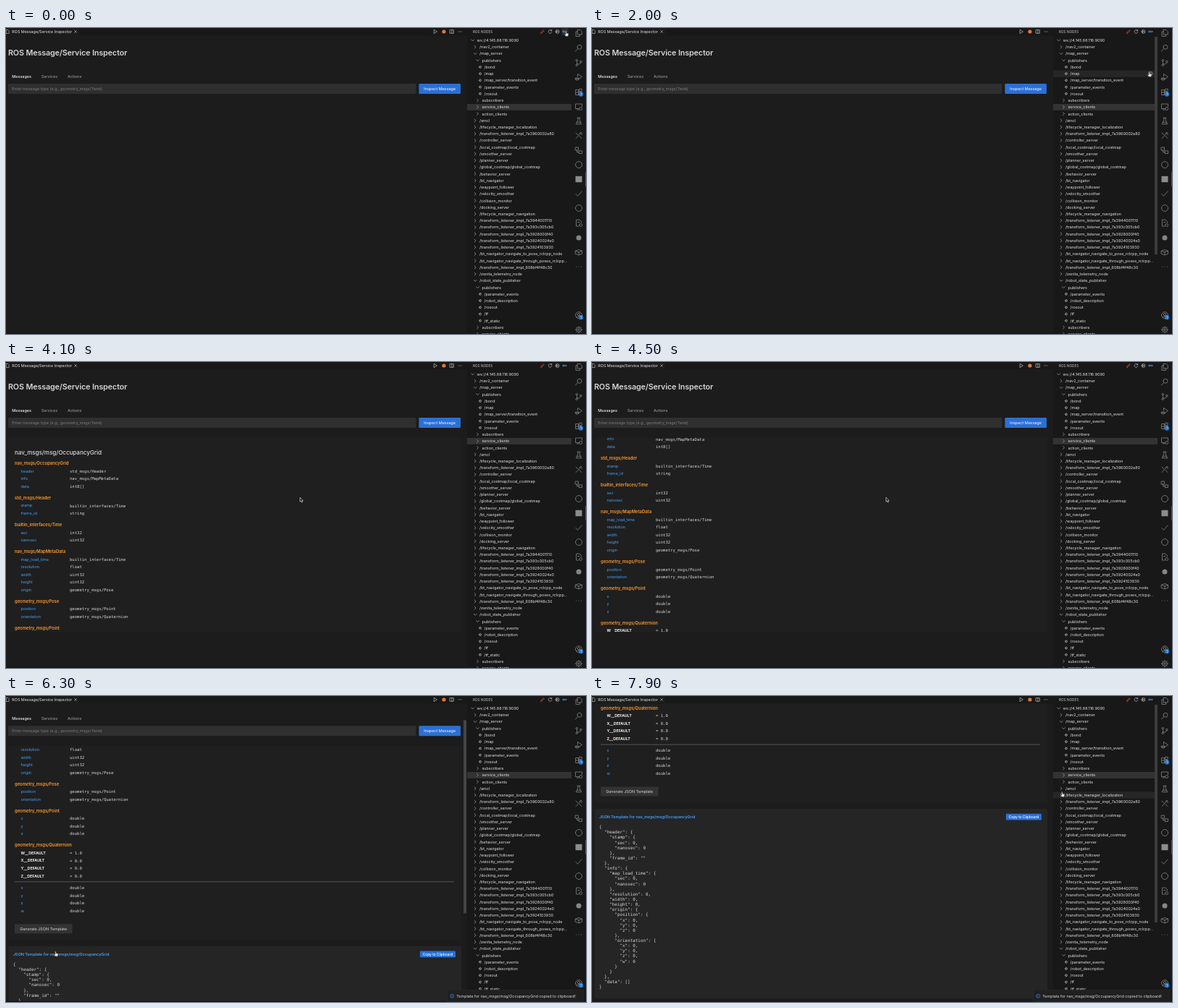
An HTML page for the animation above (8 s loop, 800 by 423 pixels).

```html
<!DOCTYPE html>
<html lang="en">
<head>
<meta charset="utf-8">
<title>Message inspector</title>
<style>
html, body { margin: 0; width: 100%; height: 100%; overflow: hidden; background: #1c1c1d; }
svg { display: block; width: 800px; height: 423px; font: 5.45px Inter, "Liberation Sans", sans-serif; }
.mono { font-family: "DejaVu Sans Mono", "Liberation Mono", monospace; }
.icon { fill: none; stroke: #858585; stroke-width: .8; stroke-linejoin: round; stroke-linecap: round; }
</style>
</head>
<body>
<svg id="stage" viewBox="0 0 800 423"></svg>
<script>
const LOOP = 8000, STEP = 100, ROW = 9.23, INNER = 173.4, PAGE = 225.5;
const GREY = '#d8d8d8', BLUE = '#45a4fa', ORANGE = '#fa9a2c';

const text = (x, y, s, fill = GREY, size = 5.45, extra = '') =>
  `<text x="${x}" y="${y + size * .37}" font-size="${size}" fill="${fill}" ${extra}>${s}</text>`;
const mono = (x, y, s, size = 5.57) => text(x, y, s, GREY, size, 'class="mono"');
const box = (x, y, w, h, fill, r = 0, extra = '') =>
  `<rect x="${x}" y="${y}" width="${w}" height="${h}" rx="${r}" fill="${fill}" ${extra}/>`;
const icon = (x, y, d, extra = '') => `<path class="icon" transform="translate(${x} ${y})" d="${d}" ${extra}/>`;
const disc = (x, y, r, fill) => `<circle cx="${x}" cy="${y}" r="${r}" fill="${fill}"/>`;
const ring = r => `M${-r} 0a${r} ${r} 0 1 0 ${2 * r} 0a${r} ${r} 0 1 0 ${-2 * r} 0`;
const style = (color, width = .7) => `style="stroke:${color};stroke-width:${width}"`;
const SEMI = 'font-weight="600"', MEDIUM = 'font-weight="500"', MID = 'text-anchor="middle"';

// ---- message definition
const types = `nav_msgs/OccupancyGrid|header std_msgs/Header|info nav_msgs/MapMetaData|data int8[]
std_msgs/Header|stamp builtin_interfaces/Time|frame_id string
builtin_interfaces/Time|sec int32|nanosec uint32
nav_msgs/MapMetaData|map_load_time builtin_interfaces/Time|resolution float|width uint32|height uint32|origin geometry_msgs/Pose
geometry_msgs/Pose|position geometry_msgs/Point|orientation geometry_msgs/Quaternion
geometry_msgs/Point|x double|y double|z double
geometry_msgs/Quaternion|W =1.0|X =0.0|Y =0.0|Z =0.0|-|x double|y double|z double|w double`;

function definition() {
  let y = 140, out = text(12, 124.7, 'nav_msgs/msg/OccupancyGrid', '#dcdcdc', 8, MEDIUM);
  for (const line of types.split('\n')) {
    const [head, ...fields] = line.split('|');
    out += text(12, y, head, ORANGE, 5.85, SEMI);
    y += 10.8;
    for (const field of fields) {
      const [name, type] = field.split(' ');
      if (name === '-') {
        out += box(12, y - 2.7, 606, .7, '#6c6c6c');
        y += 5.8;
        continue;
      }
      const constant = type[0] === '=';
      out += constant
        ? text(20.5, y, name + '__DEFAULT', '#f0f0f0', 5.3, 'font-weight="700"')
        : text(20.5, y, name, BLUE);
      out += mono(88, y, constant ? '= ' + type.slice(1) : type);
      y += 10.55;
    }
    y += 5.2;
  }
  return out + box(12, 351 + INNER, 79.5, 13, '#333334', 1) +
    text(51.7, 357.6 + INNER, 'Generate JSON Template', GREY, 5.45, MID);
}

// ---- JSON panel
const time = { sec: 0, nanosec: 0 }, point = { x: 0, y: 0, z: 0 };
const sample = {
  header: { stamp: time, frame_id: '' },
  info: {
    map_load_time: time, resolution: 0, width: 0, height: 0,
    origin: { position: point, orientation: { ...point, w: 0 } }
  },
  data: []
};
function jsonPanel() {
  const lines = JSON.stringify(sample, null, 2).split('\n');
  return box(3.5, 381.5, 624.5, 262, '#252526', 1) +
    text(10, 392.7, 'JSON Template for nav_msgs/msg/OccupancyGrid', BLUE, 5.4, SEMI) +
    box(571, 388.3, 49, 8.8, '#2b70d4', 1) +
    text(595.5, 392.7, 'Copy to Clipboard', '#fff', 4.8, MID + ' ' + MEDIUM) +
    lines.map((line, i) => {
      const s = line.trimStart();
      return mono(10 + (line.length - s.length) * 3.56, 406.5 + i * 7.13, s, 5.91);
    }).join('');
}

// ---- node tree: depth, kind (> closed, v open, o topic), label
const tree = `0v ws://4.145.88.116:9090
1> /nav2_container
1v /map_server
2v publishers
3o /bond
3o /map
3o /map_server/transition_event
3o /parameter_events
3o /rosout
2> subscribers
2> service_clients
2> action_clients
1> /amcl
1> /lifecycle_manager_localization
1> /transform_listener_impl_7a3960002a80
1> /controller_server
1> /local_costmap/local_costmap
1> /smoother_server
1> /planner_server
1> /global_costmap/global_costmap
1> /behavior_server
1> /bt_navigator
1> /waypoint_follower
1> /velocity_smoother
1> /collision_monitor
1> /docking_server
1> /lifecycle_manager_navigation
1> /transform_listener_impl_7a3944001110
1> /transform_listener_impl_7a393c005cb0
1> /transform_listener_impl_7a3928000f40
1> /transform_listener_impl_7a39240024e0
1> /transform_listener_impl_7a3924103930
1> /bt_navigator_navigate_to_pose_rclcpp_node
1> /bt_navigator_navigate_through_poses_rclcpp...
1> /transform_listener_impl_608bf4f48c30
1> /zenita_telemetry_node
1v /robot_state_publisher
2v publishers
3o /parameter_events
3o /robot_description
3o /rosout
3o /tf
3o /tf_static
2> subscribers
2> service_clients`.split('\n');

const marks = { '>': 'M-1 -1.9L1 0L-1 1.9', 'v': 'M-1.9 -1L0 1L1.9 -1', 'o': ring(1.4) };
const treeRows = () => tree.map((line, i) => {
  const depth = +line[0], kind = line[1], y = 17 + i * ROW;
  const x = 643.7 + depth * 3.45;
  return icon(x, y, marks[kind], style('#c0c0c0', kind === 'o' ? .8 : .6)) +
    text(x + (depth === 3 ? 5.5 : 5.9), y, line.slice(3), '#e2e2e2', 5.4);
}).join('');

// ---- activity bar
const activity = [
  [7, 'M-1.5 -4.5H2L4.3 -2.2V2H-1.5ZM-1.5 -2H-4V4.5H1.5V2'],
  [27.5, 'M-1.5 1.2L-4.5 4.5M-2 -1.2a3 3 0 1 0 6 0a3 3 0 1 0 -6 0'],
  [48, 'M-2.5 -2V2M-3.9 -3.3a1.3 1.3 0 1 0 2.6 0a1.3 1.3 0 1 0 -2.6 0M-3.9 3.3a1.3 1.3 0 1 0 2.6 0a1.3 1.3 0 1 0 -2.6 0M1.6 -1.4a1.3 1.3 0 1 0 2.6 0a1.3 1.3 0 1 0 -2.6 0M2.9 0Q2.5 2 -2.3 2'],
  [68, 'M-1.5 -1V-4.5L4.5 -.5L0 2.6M-4 1H-.5V3.5Q-2.2 5.5 -4 3.5ZM-5 2.4H.4'],
  [88.5, 'M-4 -3H-.5V4H-4ZM-4 .5H3.5V4H-.5M1 -4.2H4.2V-1H1Z'],
  [108.5, 'M0 3H-4.5V-3.5H4.5V0M-2.5 4.5H0M.7 3a2 2 0 1 0 4 0a2 2 0 1 0 -4 0'],
  [128.5, 'M-2 -4.3H2M-1.2 -4.3V-1L-3.8 4.3H3.8L1.2 -1V-4.3M-2.6 1.8H2.6'],
  [148.5, 'M-4 -3.5L-1 -.5M-4 4L1 -1A2.4 2.4 0 0 1 4 -4L2.5 -2.3L3.8 -1L4.5 -2M1 1L4 4'],
  [169, 'M-4.5 -4H-.5V0H-4.5ZM.5 .8H4.5V4.5H.5ZM-2.5 0V2.7H.5'],
  [189, ring(4.5)],
  [229, 'M-4.2 .5L-1.5 3.2L4.2 -3.2'],
  [249, ring(4.5)],
  [269.5, 'M3.5 -.5V-2L1 -4.5H-3.5V4.5H0M-1.5 -1H1M.8 3a1.9 1.9 0 1 0 3.8 0a1.9 1.9 0 1 0 -3.8 0'],
  [310, 'M-4.5 -1.8L0 -3.5L4.5 -1.8V2.2L0 3.8L-4.5 2.2ZM-4.5 -1.8L0 0L4.5 -1.8M0 0V3.8'],
  [330, 'M-3.5 0h.1M0 0h.1M3.5 0h.1'],
  [397, ring(4.5) + 'M-1.7 -1a1.7 1.7 0 1 0 3.4 0a1.7 1.7 0 1 0 -3.4 0M-3 3.2Q0 -.4 3 3.2'],
  [417, ring(3.4) + ring(1.3) + 'M0 -4.7V-3.4M0 3.4V4.7M-4.7 0H-3.4M3.4 0H4.7M-3.3 -3.3L-2.4 -2.4M3.3 3.3L2.4 2.4M-3.3 3.3L-2.4 2.4M3.3 -3.3L2.4 -2.4']
];
const badge = y => disc(793, y, 3.2, '#2479d6') + text(793, y, '1', '#fff', 4.2, MID);
const activityBar = () => box(781, 0, 19, 423, '#181818') +
  activity.map(([y, d]) => icon(790, y, d)).join('') +
  box(785.5, 204.8, 9, 8.4, '#8c8c8c') + disc(790, 290, 3.5, '#858585') +
  box(799.2, 199, .8, 20, '#2269bb') + badge(91.5) + badge(400);

const infoIcon = (x, y, color) =>
  icon(x, y, ring(2.6) + 'M0 -.4V1.4M0 -1.5V-1.4', style(color, .6));

const stage = document.getElementById('stage');
stage.innerHTML = `
<clipPath id="inner"><rect x="3" y="104.5" width="625" height="268.5"/></clipPath>
${box(0, 0, 800, 423, '#1c1c1d')}
<g id="page">
  ${text(3, 34.5, 'ROS Message/Service Inspector', '#d6d6d6', 10.7, SEMI + ' letter-spacing="-.1"')}
  ${text(8.3, 67, 'Messages', '#f4f4f4', 5.45, MEDIUM)}
  ${text(48.7, 67, 'Services', '#aaa')}
  ${text(85, 67, 'Actions', '#aaa')}
  ${box(3, 77, 562.5, 14, '#2f2f30', 1)}
  ${text(8.3, 84.2, 'Enter message type (e.g., geometry_msgs/Twist)', '#7c7c7c', 5.4)}
  ${box(569.5, 77, 57.5, 14, '#2b70d4', 1)}
  ${text(598.2, 84.2, 'Inspect Message', '#fff', 5.45, MID)}
  <g id="result">${box(3, 104.5, 625, 268.5, '#1f1f20', 1)}
    <g clip-path="url(#inner)"><g id="fields">${definition()}</g></g></g>
  <g id="json">${jsonPanel()}</g>
</g>
<rect id="thumb" x="631" width="4" height="267" fill="#454545"/>
${box(0, 0, 636, 10.3, '#181818')}${box(0, 0, 101, 10.3, '#1c1c1d')}
${icon(2.3, 5, 'M-1.7 -2.5H.6L1.8 -1.2V2.5H-1.7Z', style('#c8c8c8', .6))}
${text(8.3, 5, 'ROS Message/Service Inspector', '#ececec', 5.4)}
${icon(96, 5, 'M-1.5 -1.5L1.5 1.5M1.5 -1.5L-1.5 1.5', style('#c8c8c8', .6))}
${icon(592.3, 5, 'M-1.7 -2.5L2.2 0L-1.7 2.5Z', style('#bdbdbd'))}
${disc(604, 5, 2.6, '#d97a3c')}
${icon(615, 5, 'M-2.5 -2.3H2.5V2.3H-2.5ZM0 -2.3V2.3', style('#bdbdbd'))}
${icon(626, 5, 'M-2 0h.1M0 0h.1M2 0h.1', style('#bdbdbd', .9))}
${box(0, 421.6, 636, 1.4, '#1e1113')}
${box(636, 0, 145, 423, '#181818')}
${text(644, 5, 'ROS NODES', '#cecece', 4.7)}
${box(766.5, .8, 9, 8.6, '#303031', 1, 'id="iconHover"')}
${icon(740, 5, 'M-2.3 2.3L-1.8 .8L1.3 -2.3L2.3 -1.3L-.8 1.8Z', style('#d2503a', .8))}
${icon(750.5, 5, 'M2 -1.5A2.4 2.4 0 1 0 2.4 .6M2.2 -2.7V-1.2H.7', style('#bdbdbd'))}
${icon(760.5, 5, ring(2.5) + 'M-.7 -1.2L1.2 0L-.7 1.2Z', style('#bdbdbd'))}
${icon(770.5, 5, 'M-2.6 0a1.1 1.1 0 1 0 2.2 0a1.1 1.1 0 1 0 -2.2 0M-.4 0H2.6M1.6 -1L2.6 0L1.6 1', style('#3794ff', .9))}
${box(636, 105, 144, 8.8, '#333334')}
${box(636, 0, 144, ROW, '#262627', 0, 'id="rowHover"')}
${treeRows()}
<g id="info">${infoIcon(770.5, 0, '#c8c8c8')}</g>
${box(776, 12, 4, 301, '#3c3c3d', 0, 'id="treeThumb"')}
${activityBar()}
<g id="toast">${box(608.5, 406.3, 188.5, 16.7, '#202021', 1, 'stroke="#2d2d2e" stroke-width=".5"')}
  ${infoIcon(615.3, 414.8, '#3794ff')}
  ${text(621.3, 414.8, 'Template for nav_msgs/msg/OccupancyGrid copied to clipboard!', '#dcdcdc', 5.36)}</g>
<path id="arrow" d="M-1.4 -3.4V2.6L0 1.4L1 3.6L2 3.1L1.1 1.1H2.8Z" fill="#111" stroke="#f4f4f4" stroke-width=".6"/>
<path id="hand" d="M-1.4 -3.5Q-.7 -4 -.2 -3.3L.2 -.9L2.4 -.4Q3.1 0 2.9 1L2.2 3.4H-1L-2.8 .7Q-2.7 -.1 -1.9 .3L-1 1Z"
  fill="#f4f4f4" stroke="#1a1a1a" stroke-width=".5"/>`;

// ---- motion
const el = Object.fromEntries([...stage.querySelectorAll('[id]')].map(n => [n.id, n]));
const show = (node, on) => node.setAttribute('visibility', on ? 'visible' : 'hidden');
const move = (node, x, y) => node.setAttribute('transform', `translate(${x} ${y})`);
const ease = (t, a, b) => {
  const p = Math.min(1, Math.max(0, (t - a) / (b - a)));
  return p * p * (3 - 2 * p);
};
// start, end, x, y of each pointer move
const path = [
  [0, 1, 773, 8], [100, 1000, 775, 82], [1200, 1950, 769, 64], [2100, 2700, 572, 112],
  [3300, 4000, 407, 190.5], [5000, 5700, 69, 356.5], [6900, 7750, 649, 136]
];

function pointer(t) {
  let [, , x, y] = path[0];
  for (const [a, b, px, py] of path) {
    const p = ease(t, a, b);
    x += (px - x) * p;
    y += (py - y) * p;
  }
  return [x, y];
}

function draw(now) {
  const t = Math.floor((now % LOOP) / STEP) * STEP, [x, y] = pointer(t);
  const inner = INNER * ease(t, 4200, 5000), scroll = PAGE * ease(t, 6150, 6745);

  show(el.result, t >= 3300);
  show(el.json, t >= 6000);
  show(el.toast, t >= 6200);
  move(el.fields, 0, -inner);
  move(el.page, 0, -scroll);
  show(el.thumb, t >= 6150 && t < 7200);
  el.thumb.setAttribute('y', 10.3 + scroll * .646);

  const inTree = x > 636 && y > 12, row = Math.round((y - 17) / ROW);
  show(el.rowHover, inTree && row !== 10);
  show(el.treeThumb, inTree);
  el.rowHover.setAttribute('y', 17 + (row - .5) * ROW);
  show(el.info, inTree && tree[row][1] === 'o');
  move(el.info, 0, 17 + row * ROW);
  show(el.iconHover, x > 766 && y < 10);

  const pointing = x > 636 || (x < 92 && y > 350);
  show(el.hand, pointing);
  show(el.arrow, !pointing);
  move(el.hand, x, y);
  move(el.arrow, x, y);
}

const start = performance.now();
(function tick() {
  draw(performance.now() - start);
  requestAnimationFrame(tick);
})();
</script>
</body>
</html>
```
